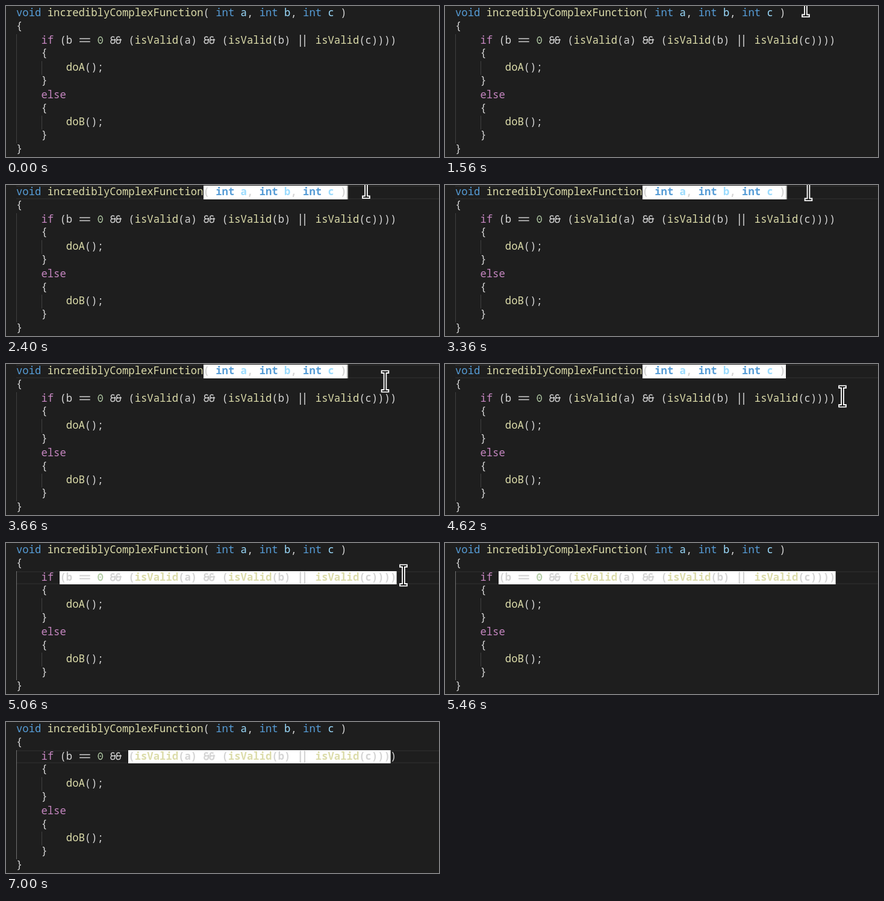
Write an HTML page with a canvas that moves like this. It is 719 px wide and 252 px high and loops after 8 s.

```html
<!DOCTYPE html>
<html lang="en">
<head>
<meta charset="utf-8">
<title>Expanding selection</title>
<style>
html, body { margin: 0; width: 719px; height: 252px; overflow: hidden; background: #1e1e1e; }
canvas { display: block; }
</style>
</head>
<body>
<canvas id="stage" width="719" height="252"></canvas>
<script>
const ctx = document.getElementById('stage').getContext('2d', { alpha: false });
const LOOP = 8000, LEFT = 17, PITCH = 10.35, LINE = 22.8;
const FONT = '17.25px "Noto Sans Mono", "DejaVu Sans Mono", monospace';
const PLAIN = '#d4d4d4';

const code = [
  'void incrediblyComplexFunction( int a, int b, int c )',
  '{',
  '    if (b == 0 && (isValid(a) && (isValid(b) || isValid(c))))',
  '    {',
  '        doA();',
  '    }',
  '    else',
  '    {',
  '        doB();',
  '    }',
  '}'
];

const colX = col => LEFT + col * PITCH;
const rowTop = row => Math.round(1 + row * LINE);
const baseline = row => Math.round(17 + row * LINE);

function colorOf(word, row, called) {
  if (word === 'void' || word === 'int') return '#569cd6';
  if (word === 'if' || word === 'else') return '#c586c0';
  if (word === '0') return '#b5cea8';
  if (called) return '#dcdcaa';
  return row === 0 && /\w/.test(word) ? '#9cdcfe' : PLAIN;
}

const tokens = code.map((line, row) =>
  [...line.matchAll(/&&|\|\||==|\w+|\S/g)].map(m => {
    const word = m[0], col = m.index;
    const called = /\w/.test(word) && line[col + word.length] === '(';
    return { word, col, color: colorOf(word, row, called) };
  }));

// An ampersand with a closed bowl and a crossbar.
function ampersand(x, y) {
  ctx.beginPath();
  ctx.moveTo(x + 6.6, y - 10.6);
  ctx.bezierCurveTo(x + 4, y - 12.6, x + 1, y - 11.4, x + 1, y - 9.2);
  ctx.quadraticCurveTo(x + 1, y - 6.5, x + 4, y - 6.5);
  ctx.lineTo(x + 9.3, y - 6.5);
  ctx.moveTo(x + 4, y - 6.5);
  ctx.bezierCurveTo(x - 0.6, y - 6.5, x - 0.6, y - 0.4, x + 3.8, y - 0.4);
  ctx.quadraticCurveTo(x + 7.2, y - 0.4, x + 7.2, y - 4);
  ctx.lineTo(x + 7.2, y - 8.6);
  ctx.stroke();
}

// Operators and the zero have shapes of their own, as in a ligature font.
const special = {
  '=='(x, y, w) {
    for (const dy of [8.5, 3.5]) ctx.fillRect(x + 1.6, y - dy - w / 2, 17.6, w);
  },
  '||'(x, y, w) {
    for (const dx of [-4.3, 2.9]) ctx.fillRect(x + PITCH + dx - w / 2, y - 15, w, 20);
  },
  '&&'(x, y, w) {
    ctx.lineWidth = w;
    ampersand(x + 1.2, y);
    ampersand(x + 10.4, y);
  },
  '0'(x, y, w) {
    const cx = x + PITCH / 2, cy = y - 6;
    ctx.lineWidth = w;
    ctx.beginPath();
    ctx.ellipse(cx, cy, 3.5, 5.4, 0, 0, 7);
    ctx.stroke();
    ctx.beginPath();
    ctx.arc(cx, cy, 1.1, 0, 7);
    ctx.fill();
  }
};

function drawRow(row, bold) {
  const y = baseline(row), weight = bold ? 2.2 : 1.5;
  ctx.font = (bold ? 'bold ' : '') + FONT;
  for (const { word, col, color } of tokens[row]) {
    const lift = /[{}]/.test(word) ? 1 : 0;
    ctx.fillStyle = ctx.strokeStyle = color;
    if (special[word]) special[word](colX(col), y, weight);
    else [...word].forEach((ch, i) => ctx.fillText(ch, colX(col + i), y - lift));
  }
}

function guide(col, from, to, color) {
  ctx.fillStyle = color;
  ctx.fillRect(Math.ceil(colX(col)), rowTop(from), 1, rowTop(to) - rowTop(from));
}

function selectionAt(t) {
  if (t < 2400) return null;
  if (t < 5060) return { row: 0, from: 30, to: 53, caret: t < 3920 };
  return { row: 2, from: 7 + (t >= 7000 ? 11 : 0), to: t >= 7000 ? 60 : 61, caret: true };
}

function drawLineBorder(row) {
  ctx.fillStyle = '#282828';
  ctx.fillRect(LEFT, rowTop(row), 719, 2);
  ctx.fillRect(LEFT, rowTop(row + 1) - 2, 719, 2);
}

function drawSelection({ row, from, to, caret }) {
  const x = Math.round(colX(from)), end = Math.round(colX(to));
  const y = rowTop(row), h = rowTop(row + 1) - y;
  ctx.save();
  ctx.beginPath();
  ctx.rect(x, y, end - x, h);
  ctx.clip();
  ctx.fillStyle = '#fff';
  ctx.fillRect(x, y, end - x, h);
  drawRow(row, true);
  ctx.restore();
  if (caret) {
    ctx.fillStyle = '#aeafad';
    ctx.fillRect(end, y, row ? 1 : 2, h);
  }
}

// Pointer path: time, x, y
const path = [
  [840, 604, -19], [1260, 616.5, 11.5], [1559, 616.5, 11.5],
  [1560, 599, 0.5], [1780, 599, 0.5], [1820, 599, 3.5], [2079, 599, 3.5],
  [2080, 598, 4.5], [3300, 598, 4.5], [3660, 629.5, 29], [3720, 629.5, 29],
  [4080, 647, 49.5], [4160, 647, 49.5], [4460, 659, 53.5],
  [4580, 659, 53.5], [4620, 660, 54], [5260, 660, 54], [5460, 704, -20]
];

function pointerAt(t) {
  const i = path.findIndex(p => p[0] > t);
  if (i < 1) return null;
  const [t0, x0, y0] = path[i - 1], [t1, x1, y1] = path[i];
  const k = (t - t0) / (t1 - t0);
  return [x0 + (x1 - x0) * k, y0 + (y1 - y0) * k];
}

// A black I-beam with a thick white rim.
function drawPointer([x, y]) {
  ctx.save();
  ctx.translate(Math.round(x * 2) / 2, Math.round(y * 2) / 2);
  ctx.lineCap = 'square';
  ctx.beginPath();
  for (const s of [-1, 1]) {
    ctx.moveTo(-4, 15.8 * s);
    ctx.lineTo(4, 15.8 * s);
  }
  ctx.moveTo(0, -15);
  ctx.lineTo(0, 15);
  for (const [color, width] of [['#fff', 5.6], ['#000', 1.8]]) {
    ctx.strokeStyle = color;
    ctx.lineWidth = width;
    ctx.stroke();
  }
  ctx.restore();
}

function draw(t) {
  const selection = selectionAt(t), pointer = pointerAt(t);
  ctx.fillStyle = '#1e1e1e';
  ctx.fillRect(0, 0, 719, 252);
  if (selection) drawLineBorder(selection.row);
  guide(0, 2, 10, t >= 5060 ? '#707070' : '#404040');
  guide(4, 4, 5, '#404040');
  guide(4, 8, 9, '#404040');
  code.forEach((_, row) => drawRow(row, false));
  if (selection) drawSelection(selection);
  if (pointer) drawPointer(pointer);
}

const start = performance.now();
function tick() {
  draw((performance.now() - start) % LOOP);
  requestAnimationFrame(tick);
}
tick();
</script>
</body>
</html>
```
